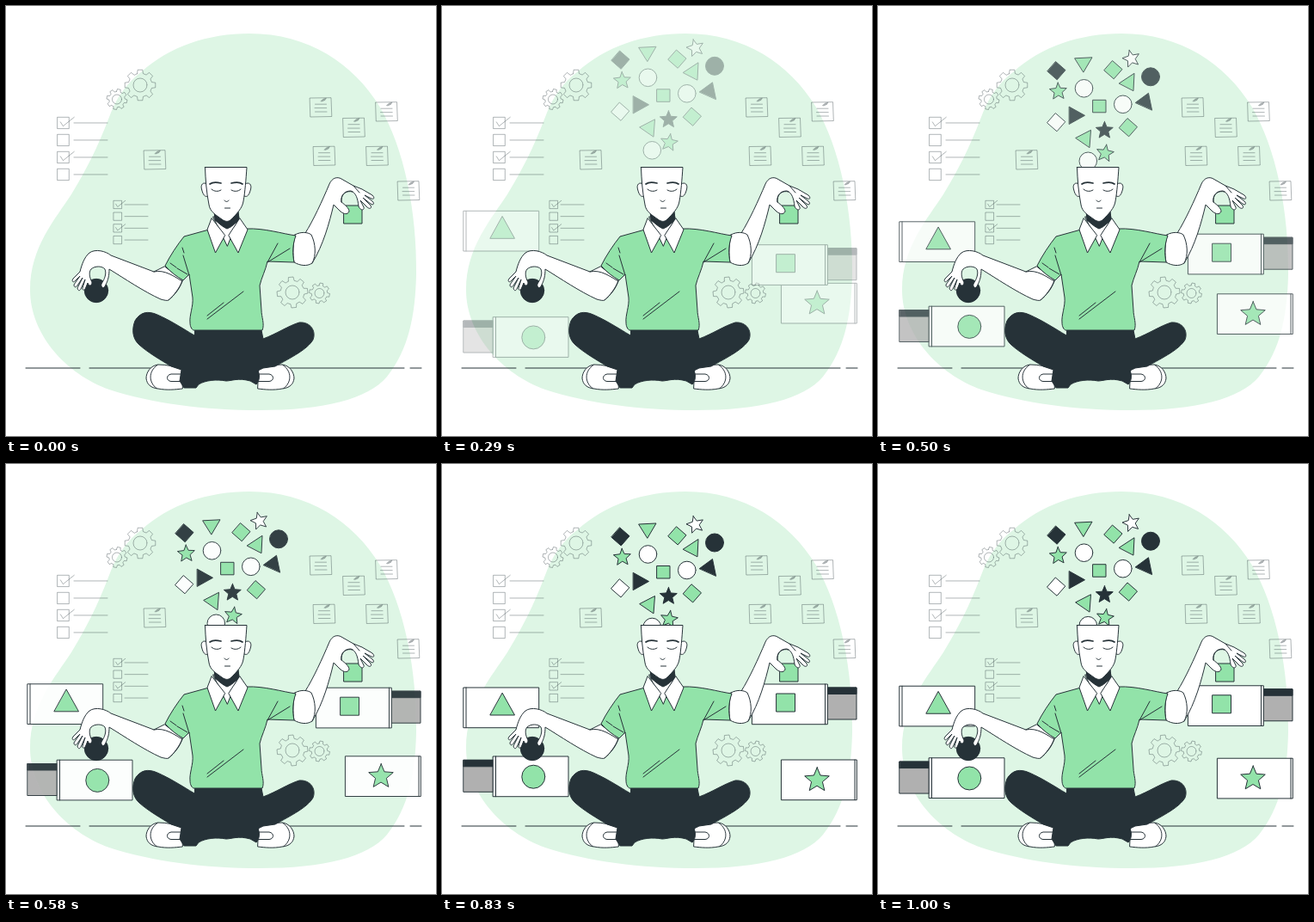
An HTML page with a canvas for the animation above (1040 ms loop, 500 by 500 pixels).

```html
<!DOCTYPE html>
<html lang="en">
<head>
<meta charset="utf-8">
<title>Balance</title>
<style>
html, body { margin: 0; width: 100%; height: 100%; overflow: hidden; background: #fff; }
canvas { display: block; width: 500px; height: 500px; }
</style>
</head>
<body>
<canvas id="stage"></canvas>
<script>
const SIZE = 500, LOOP = 1040, FPS = 24, LAST_TICK = 24;
const INK = '#263238', GREEN = '#92e3a9', PALE = '#def6e5', WHITE = '#fff', GREY = '#b0b0b0';
const FAINT = 'rgba(38,50,56,.36)';
const ratio = window.devicePixelRatio || 1;

function setup(canvas) {
  canvas.width = canvas.height = SIZE * ratio;
  const context = canvas.getContext('2d');
  context.scale(ratio, ratio);
  context.lineJoin = context.lineCap = 'round';
  return context;
}
const stage = setup(document.getElementById('stage'));
const layer = setup(document.createElement('canvas'));
const backdrop = setup(document.createElement('canvas'));
const person = setup(document.createElement('canvas'));
let ctx = stage;

function paint(path, fill, stroke = INK, width = 1) {
  if (fill) { ctx.fillStyle = fill; ctx.fill(path); }
  if (stroke) { ctx.strokeStyle = stroke; ctx.lineWidth = width; ctx.stroke(path); }
}
const shape = (d, fill, stroke, width) => paint(new Path2D(d), fill, stroke, width);
const line = (d, stroke, width) => shape(d, null, stroke, width);
const rect = (x, y, w, h, fill, stroke) => shape(`M${x} ${y}h${w}v${h}h${-w}Z`, fill, stroke);

function circle(x, y, r, fill, stroke) {
  const path = new Path2D();
  path.arc(x, y, r, 0, Math.PI * 2);
  paint(path, fill, stroke);
}

function radial(x, y, points, fill, stroke) {
  const path = new Path2D();
  for (const [r, a] of points) path.lineTo(x + r * Math.sin(a), y - r * Math.cos(a));
  path.closePath();
  paint(path, fill, stroke);
}

function star(x, y, r, fill, tilt = 0) {
  const points = [];
  for (let i = 0; i < 10; i++) points.push([i % 2 ? r * .45 : r, tilt + i * Math.PI / 5]);
  radial(x, y, points, fill);
}

const diamond = (x, y, fill) =>
  shape(`M${x - .7} ${y - 10.5}L${x + 10.5} ${y - .7}L${x + .7} ${y + 10.5}L${x - 10.5} ${y + .7}Z`, fill);

function gear(x, y, r, hole, tilt) {
  const points = [], step = Math.PI / 4;
  for (let i = 0; i < 8; i++) {
    const a = tilt + i * step;
    points.push([r * .77, a - step * .32], [r, a - step * .2], [r, a + step * .2], [r * .77, a + step * .32]);
  }
  radial(x, y, points, null, FAINT);
  circle(x, y, hole, null, FAINT);
}

function note(x, y) {
  ctx.save();
  ctx.translate(x, y);
  shape('M-12.5 -11L12 -11.3L12.8 10.5L-11.8 11Z', null, FAINT);
  line('M-6.5 -3.8H6.5M-7 .6H6.7M-6.5 5H7', FAINT);
  shape('M0 -7.5L3 -10L6.5 -11L5 -8.5L1.5 -7Z', FAINT, FAINT, .5);
  ctx.restore();
}

function checklist(x, y, box, gap, from, to) {
  for (let i = 0; i < 4; i++) {
    const top = y + i * gap;
    rect(x, top, box, box, null, FAINT);
    line(`M${from} ${top + box / 2}H${to}`, FAINT);
    if (i % 2 === 0) {
      line(`M${x + box * .25} ${top + box * .42}L${x + box * .48} ${top + box * .78}L${x + box * 1.45} ${top}`, FAINT);
    }
  }
}

function drawBackdrop() {
  shape('M283 32C352 32 404 67 434.500 117C463 165 478 240 477 312C476 360 468 400 443 431C421 457 370 470 295 470C230 470 170 462 120 446C70 428 28 382 28 330C28 280 58 247 76 219C100 180 113 148 122 124C130 104 142 88 157 77C190 47 235 32 283 32Z', PALE, null);
  line('M23 421H86M97 421H463M470 421H483');
  gear(156, 92, 18, 8, 0);
  gear(129, 108.5, 12, 5.5, .2);
  gear(333, 333, 18, 8, -.1);
  gear(364.5, 334, 12, 5.5, .2);
  for (const [x, y] of [[366, 118], [442.5, 123], [404.5, 141.5], [370, 174.5], [431.5, 174.5], [468, 215], [173, 179]]) note(x, y);
  checklist(60, 129.3, 13.3, 20, 79, 118);
  checklist(125.3, 226.3, 9.3, 13.7, 138, 165);
}

function drawTokens() {
  diamond(207.5, 82.5, INK);
  shape('M229 68L249 67L239 84Z', GREEN);
  diamond(273.5, 81.5, GREEN);
  star(294.5, 68.5, 10.5, WHITE, -.25);
  circle(317, 89.5, 10.5, INK);
  shape('M280.5 97L298 85.5L297 105.5Z', GREEN);
  star(209.5, 106.5, 10.5, GREEN, -.05);
  circle(239.5, 103, 10.3, WHITE);
  rect(250, 116.5, 15, 14.5, GREEN);
  circle(284.8, 121.5, 10.3, WHITE);
  shape('M299.5 119.5L314.5 108.5L318.5 128Z', INK);
  shape('M222.5 124.5L240.5 134.5L222.5 144.5Z', INK);
  diamond(207.3, 142.5, WHITE);
  shape('M230 160.5L247.5 151.5L246 171.5Z', GREEN);
  star(263.3, 151.8, 10.5, INK);
  diamond(291, 148.5, GREEN);
  circle(244.3, 187.5, 10.3, WHITE);
  star(264, 178.5, 10.5, GREEN, .15);
}

function card(x, y, fold) {
  rect(x, y, 87.5, 46.7, WHITE);
  line(`M${fold} ${y}v46.7`);
}

function tab(x, y, w) {
  rect(x, y, w, 37, GREY);
  rect(x, y, w, 7.5, INK);
}

function drawFalling() {
  drawTokens();
  card(25.2, 258, 28);
  shape('M70.3 264.5L84.5 290H56.2Z', GREEN);
  card(394.8, 342, 480);
  star(436, 365.5, 15, GREEN);
}

function drawRising() {
  tab(448, 262, 34);
  card(360.8, 258, 445.5);
  rect(389, 269, 21.5, 21, GREEN);
  tab(25.2, 346.3, 34.5);
  card(59.5, 342, 62.5);
  circle(106.3, 365.7, 13.5, GREEN);
}

function drawShoe() {
  shape('M204 422C195 419 187 417 177 417C168 418 163 426 163 433C164 440 168 444 177 445C187 447 197 446 205 445Z', WHITE);
  line('M176 417.5C165 425 166 438 175 444.5');
  shape('M204 428H192C186 429 186 436 192 436.5H205', WHITE);
}

function drawLegs() {
  drawShoe();
  ctx.save();
  ctx.translate(498, 0);
  ctx.scale(-1, 1);
  drawShoe();
  ctx.restore();
  shape('M220 377H297L299 387C315 381 328 372 341 368C354 367 361 378 357 388C351 399 331 409 313 419L299 421L293 424C296 431 294 437 291 440L284 436C270 432 262 436 256 436C245 434 232 435 224 440L221 444H207L202 436L204 423L192 419C179 411 165 403 155 394C147 387 146 376 150 366C156 356 165 354 176 359C190 365 204 374 219 383Z', INK);
}

function drawLeftArm() {
  circle(105, 331, 13.7, INK);
  shape('M184 303L172 309L122 290C116 285 104 282 97 287C91 292 88 301 86 309L78 317C76 320 78 322 80 320L86 314L79 324C79 327 81 328 83 325L89 316L83 328C84 332 86 331 87 329L92 318L89 328C89 332 92 330 93 327L95 322C97 327 100 325 100 321C97 316 96 309 99 306C103 302 112 302 115 306C117 311 115 317 111 323C110 327 113 329 115 326C119 319 120 313 120 306C138 317 160 332 180 341C184 342 187 343 189 342C196 336 203 328 205 319Z', WHITE);
  line('M172 309C185 306 196 315 205 320M205 320C201 329 195 337 189 342');
}

function drawRightArm() {
  rect(393, 232, 21, 21, GREEN);
  shape('M348 264C357 250 368 226 376 207C379 200 385 198 390 201L404 209L414 213L426 220C429 223 428 225 425 224L417 220L426 227C429 230 427 232 424 230L415 223L424 232C426 236 422 236 420 234L412 226L416 234C417 238 412 238 410 233C409 224 407 217 401 215C393 215 389 221 390 228C394 231 399 235 399 239C397 243 393 242 389 239L381 231C376 252 369 278 356 299Z', WHITE);
  line('M390 228C389 219 395 214 403 216M404 209L411 217');
  shape('M336 266C343 262 351 263 355 266C360 276 361 290 356 299C350 303 342 302 335 298C333 288 334 276 336 266Z', WHITE);
}

function drawShirt() {
  shape('M236 260L207 268C199 278 191 290 185 302C191 309 199 315 206 319L213 312L217 339C218 349 213 360 214 368C214 373 216 376 218 377H298C301 370 297 361 297 354L295 325C297 316 302 307 304 297L335 298C333 288 333 278 337 267C322 265 300 258 280 259Z', GREEN);
  line('M205 281L207 287M206 290L213 313M191 299L198 304M199 305L211 312M316 276L304 298L330 282M276 332L234 364M253 345L234 360');
}

function drawHead() {
  shape('M241 245L271 245L257.5 279Z', WHITE);
  shape('M242 238L243 249C248 253 252 257 257 259C263 257 267 252 271 248L270 238Z', INK);
  shape('M239 247L234 260L243.5 287L254.5 267Z', WHITE);
  shape('M272 247L281 260L270 287L259 267Z', WHITE);
  shape('M234 207C229 204 226 208 227.5 213C229 219 231 223 235 221Z', WHITE);
  shape('M278 207C283 204 286 208 284.5 213C283 219 281 223 277 221Z', WHITE);
  shape('M231.5 187.5H280C279 202 278 216 276 227C275 235 268 242 261 249C258 251 255 251 251 248C244 243 237 239 236 231C233 216 232 202 231.5 187.5Z', WHITE);
  line('M237 207C241 204 246 205 250 206M262 206C266 205 271 204 275 207', INK, 1.7);
  line('M239 213C242 216 247 216 250 214M262 214C265 216 270 216 273 213M254 226C255 228 258 228 259 226M254.5 235H260.5');
}

function drawPerson() {
  drawLegs();
  drawLeftArm();
  drawRightArm();
  drawShirt();
  drawHead();
}

function onto(context, draw) {
  ctx = context;
  draw();
}

function shifted(dy, draw) {
  ctx.save();
  ctx.translate(0, dy);
  draw();
  ctx.restore();
}

onto(backdrop, drawBackdrop);
onto(person, drawPerson);

function render(time) {
  const tick = Math.min(LAST_TICK, Math.floor((time % LOOP + 5) * FPS / 1000));
  const ms = tick * 1000 / FPS;
  const enter = Math.max(0, Math.min(1, (ms - 120) / 500));
  const bob = Math.max(0, 1 - Math.abs((ms - 833) / 188));
  const drop = -30 * (1 - enter) + 2 * bob;

  layer.clearRect(0, 0, SIZE, SIZE);
  ctx = layer;
  shifted(drop, drawFalling);
  shifted(-drop, drawRising);

  stage.clearRect(0, 0, SIZE, SIZE);
  stage.drawImage(backdrop.canvas, 0, 0, SIZE, SIZE);
  stage.globalAlpha = enter;
  stage.drawImage(layer.canvas, 0, 0, SIZE, SIZE);
  stage.globalAlpha = 1;
  stage.drawImage(person.canvas, 0, 0, SIZE, SIZE);
}

const start = performance.now();
function loop() {
  render(performance.now() - start);
  requestAnimationFrame(loop);
}
loop();
</script>
</body>
</html>
```
